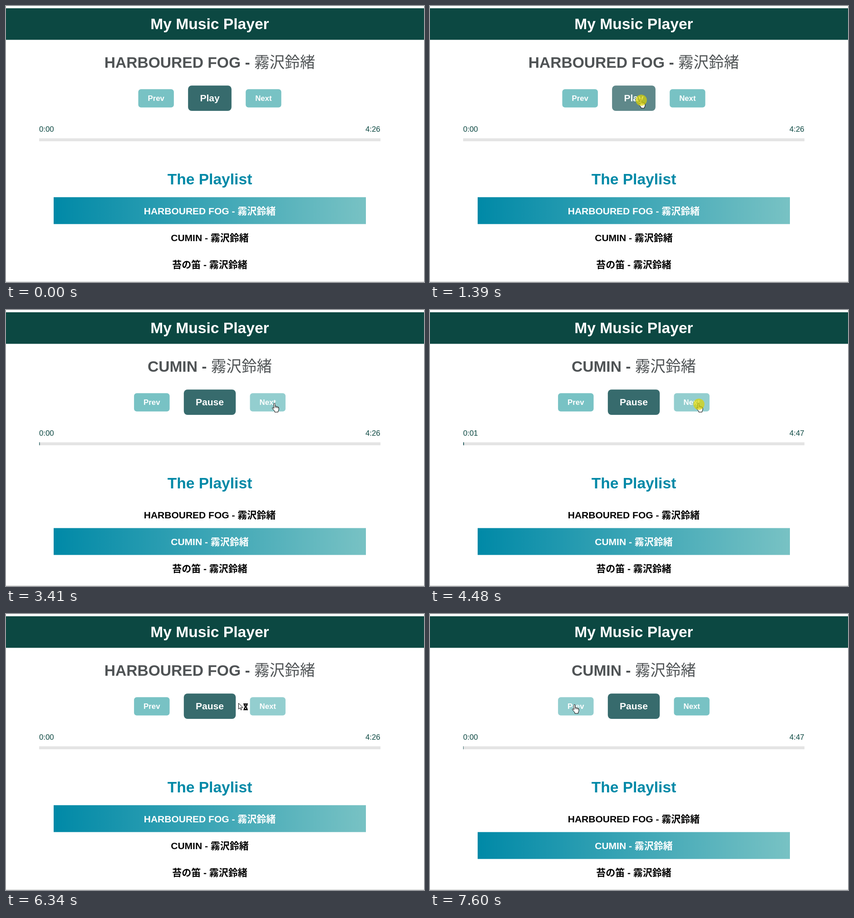
An HTML page with a canvas for the animation above (8000 ms loop, 921 px wide and 608 px high).

```html
<!DOCTYPE html>
<html lang="ja">
<head>
<meta charset="utf-8">
<title>My Music Player</title>
<style>
  html, body { margin: 0; width: 100%; height: 100%; overflow: hidden; background: #fff; }
  canvas { display: block; width: 921px; height: 608px; }
</style>
</head>
<body>
<canvas id="stage" width="921" height="608"></canvas>
<script>
const ctx = document.getElementById('stage').getContext('2d');
const LOOP = 8000, CENTER = 449, STEP = 67;
const FAMILY = '"Liberation Sans", Arial, "Noto Sans CJK JP", "Noto Sans CJK", sans-serif';
const BIG = 33.6, MID = 21, SMALL = 16.8;
const COLOR = { header: '#0c4842', title: '#4f5355', teal: '#78c2c4', dark: '#376b6d', blue: '#0089a7' };

const ARTIST = '霧沢鈴緒';
const SONGS = ['HARBOURED FOG', 'CUMIN', '苔の笛'];

// Each entry changes part of the player state from its time on.
const EVENTS = [
  [0, { song: 0, playing: false, now: '0:00', total: '4:26', progress: 0, click: false }],
  [1390, { click: true }],
  [1530, { click: false, playing: true }],
  [3340, { click: true, progress: 1.5 }],
  [3410, { click: false, song: 1 }],
  [3540, { total: '4:47', progress: 0 }],
  [3740, { progress: 1 }],
  [4480, { click: true, now: '0:01', progress: 2 }],
  [4610, { click: false, song: 2, now: '0:00', total: '5:38', progress: 1 }],
  [5280, { click: true, now: '0:01', progress: 2 }],
  [5410, { click: false, song: 0 }],
  [5480, { now: '0:00', total: '4:26', progress: 0 }],
  [6680, { click: true }],
  [6750, { click: false, song: 2 }],
  [6820, { total: '5:38', progress: 1 }],
  [6940, { now: '0:01', progress: 3.3 }],
  [7410, { click: true }],
  [7480, { click: false, song: 1, now: '0:00', progress: 0 }],
  [7600, { total: '4:47', progress: 1 }]
];

// Pointer tip: time, x, y
const PATH = [
  [120, 908, 112], [260, 853, 128], [390, 715, 145], [520, 641, 190],
  [650, 540, 217], [720, 490, 212], [790, 465, 206],
  [1800, 465, 206], [2260, 592, 206],
  [6339, 592, 206], [6340, 512, 196], [6610, 319, 200]
];

function stateAt(t) {
  return Object.assign({}, ...EVENTS.filter(e => e[0] <= t).map(e => e[1]));
}

function pointerAt(t) {
  if (t < PATH[0][0]) return null;
  const i = PATH.findIndex(p => p[0] > t);
  if (i < 0) return { x: PATH.at(-1)[1], y: PATH.at(-1)[2] };
  const [t0, x0, y0] = PATH[i - 1], [t1, x1, y1] = PATH[i];
  const k = (t - t0) / (t1 - t0);
  return { x: x0 + (x1 - x0) * k, y: y0 + (y1 - y0) * k };
}

function heldTime(t) {
  const start = [6340, 1860, 120].find(s => t >= s) ?? 0;
  return start + Math.floor((t - start) / STEP) * STEP;
}

const font = (size, bold) => `${bold ? 'bold ' : ''}${size}px ${FAMILY}`;

function text(str, x, y, size, color, bold = true, align = 'center') {
  ctx.font = font(size, bold);
  ctx.textAlign = align;
  ctx.fillStyle = color;
  ctx.fillText(str, x, y);
}

function rect(x, y, w, h, fill) {
  ctx.fillStyle = fill;
  ctx.fillRect(x, y, w, h);
}

function layoutButtons(playing) {
  const mid = playing ? 114.4 : 95.7, side = 78.4, gap = 31.3;
  const left = CENTER - mid / 2;
  return [
    { label: 'Prev', x: left - gap - side, y: 183.3, w: side, h: 40.2, r: 6, size: SMALL, base: 208.5, color: COLOR.teal },
    { label: playing ? 'Pause' : 'Play', x: left, y: 175.2, w: mid, h: 55.8, r: 8, size: MID, base: 210, color: COLOR.dark },
    { label: 'Next', x: left + mid + gap, y: 183.3, w: side, h: 40.2, r: 6, size: SMALL, base: 208.5, color: COLOR.teal }
  ];
}

const inside = (p, b) => p && p.x >= b.x && p.x <= b.x + b.w && p.y >= b.y && p.y <= b.y + b.h;

function drawButton(b, hovered) {
  ctx.globalAlpha = hovered ? 0.8 : 1;
  ctx.beginPath();
  ctx.roundRect(b.x, b.y, b.w, b.h, b.r);
  ctx.fillStyle = b.color;
  ctx.fill();
  ctx.globalAlpha = 1;
  text(b.label, b.x + b.w / 2, b.base, b.size, '#fff');
}

function drawTitle(song) {
  const name = SONGS[song] + ' - ';
  ctx.font = font(BIG, true);
  const nameWidth = ctx.measureText(name).width;
  ctx.font = font(BIG, false);
  const left = CENTER - (nameWidth + ctx.measureText(ARTIST).width) / 2;
  text(name, left, 136, BIG, COLOR.title, true, 'left');
  text(ARTIST, left + nameWidth, 136, BIG, COLOR.title, false, 'left');
}

function drawPlaylist(current) {
  text('The Playlist', CENTER, 393, BIG, COLOR.blue);
  SONGS.forEach((name, i) => {
    const y = 421.2 + 59.2 * i;
    if (i === current) {
      const fade = ctx.createLinearGradient(105, 0, 793, 0);
      fade.addColorStop(0, COLOR.blue);
      fade.addColorStop(1, COLOR.teal);
      rect(105, y, 688, 59.2, fade);
    }
    text(`${name} - ${ARTIST}`, CENTER, Math.round(y + 37.5), MID, i === current ? '#fff' : '#000');
  });
}

function outlined(path, x, y) {
  ctx.save();
  ctx.translate(x, y);
  const shape = new Path2D(path);
  ctx.fillStyle = '#fff';
  ctx.fill(shape);
  ctx.strokeStyle = '#000';
  ctx.lineWidth = 1;
  ctx.lineJoin = 'round';
  ctx.stroke(shape);
  ctx.restore();
}

function drawHand(x, y) {
  outlined('M-2 11V1Q-2-.5-.5-.5T1 1V6Q3.5 5 4 7Q6.5 6 7 8Q9 7.5 9 9.5V13Q9 15 7.5 17V19H0V17' +
    'L-5 11Q-6 9-4.5 8.5Q-3.5 8.5-2 11ZM1 6V9.5M4 7V10M7 8V10.5', x, y);
}

function drawArrow(x, y) {
  outlined('M0 0V13L3 10.3L5 15L7 14.2L5 9.6H9.4Z', x + .5, y + .5);
}

function drawHourglass(x, y) {
  ctx.fillStyle = '#111';
  ctx.fill(new Path2D(`M${x} ${y}h10v2h-1v3l-2.5 2.5l2.5 2.5v3h1v2h-10v-2h1v-3l2.5-2.5l-2.5-2.5v-3h-1z`));
  rect(x + 3, y + 3, 4, 1, '#fff');
  rect(x + 4, y + 10, 2, 2, '#fff');
}

function drawPointer(p, buttons, busy, click) {
  if (buttons.some(b => inside(p, b))) {
    drawHand(p.x, p.y);
  } else {
    drawArrow(p.x, p.y);
    if (busy) drawHourglass(p.x + 11, p.y + 1);
  }
  if (click) {
    ctx.beginPath();
    ctx.arc(p.x + .5, p.y + 1.5, 12.3, 0, Math.PI * 2);
    ctx.fillStyle = 'rgba(220, 212, 0, .7)';
    ctx.fill();
  }
}

function draw(t) {
  const s = stateAt(t), held = heldTime(t);
  const pointer = pointerAt(held);
  const hover = pointerAt(held - STEP);
  const buttons = layoutButtons(s.playing);

  rect(0, 0, 921, 608, '#fff');
  rect(0, 5, 921, 69.5, COLOR.header);
  text('My Music Player', CENTER, 51, BIG, '#fff');
  drawTitle(s.song);
  buttons.forEach(b => drawButton(b, inside(hover, b)));

  text(s.now, 73, 277, SMALL, COLOR.header, false, 'left');
  text(s.total, 824.7, 277, SMALL, COLOR.header, false, 'right');
  rect(73, 291.5, 752, 6.5, '#e4e4e4');
  rect(73, 291.5, s.progress, 6.5, COLOR.dark);

  drawPlaylist(s.song);
  rect(0, 607, 921, 1, '#c8cac9');
  if (pointer) drawPointer(pointer, buttons, t >= 6340, s.click);
}

const begin = performance.now();
function tick() {
  draw((performance.now() - begin) % LOOP);
  requestAnimationFrame(tick);
}
tick();
</script>
</body>
</html>
```
